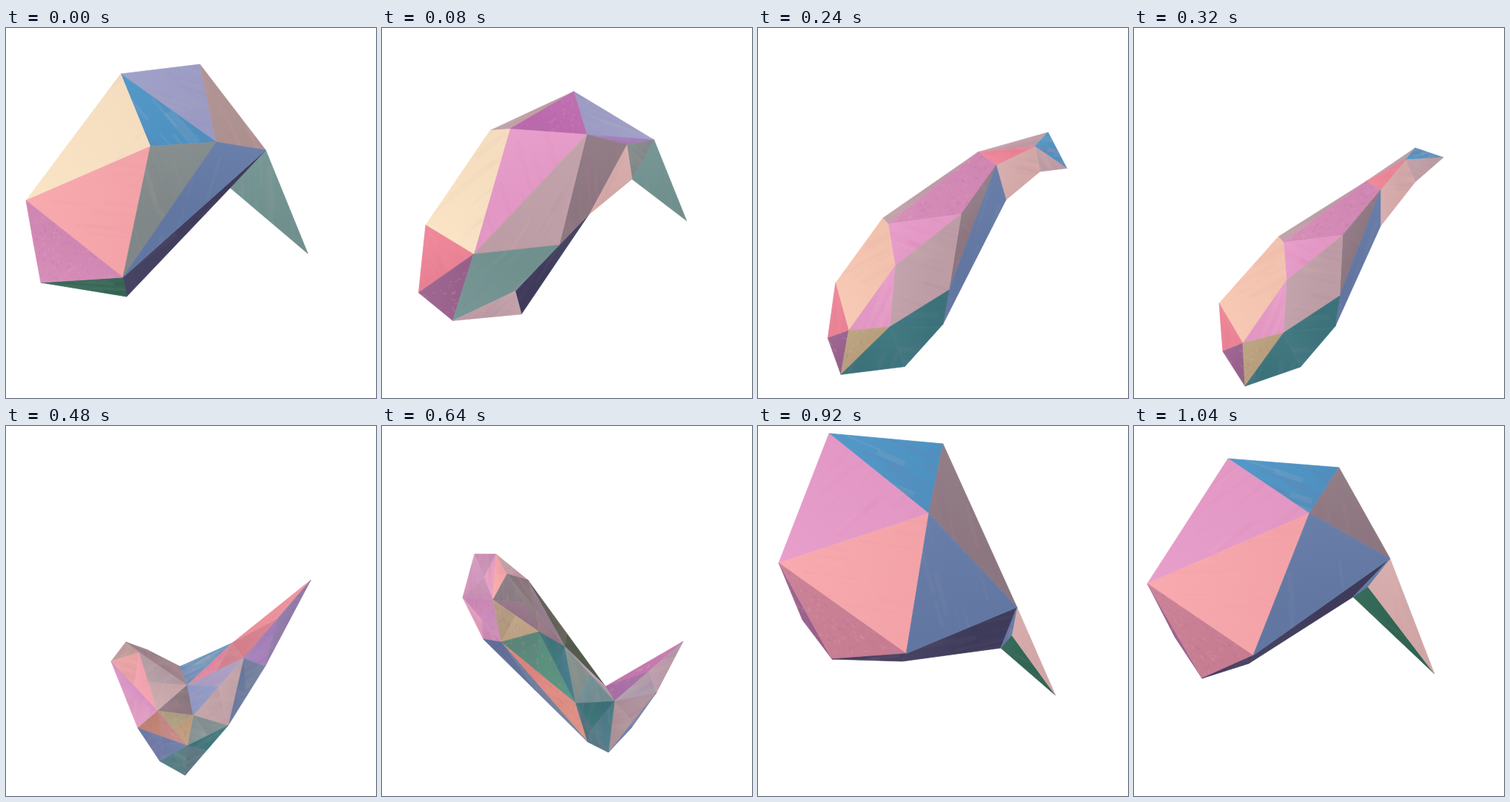
An HTML page with a canvas that plays this animation: 500 by 500 pixels, repeating every 1.12 s.

```html
<!DOCTYPE html>
<html lang="en">
<head>
<meta charset="utf-8">
<title>Faceted form</title>
<style>
  html, body { margin: 0; width: 100%; height: 100%; overflow: hidden; background: #fff; }
  canvas { display: block; width: 500px; height: 500px; }
</style>
</head>
<body>
<canvas id="stage" width="500" height="500"></canvas>
<script>
const LOOP = 1120, STEP = 40, HOLD = 1040;
const MARKS = 10; // corners a to j mark the same place on the body in every pose

const palette = {
  cream: '#fbe2c2', peach: '#f7c6b0', shell: '#edb3ad', blush: '#d5aaa9', pink: '#f8a5aa',
  rose: '#ee8295', petal: '#e799c8', orchid: '#d488b6', magenta: '#bc68ae', violet: '#a27dba',
  plum: '#985f8c', wine: '#c97c92', haze: '#bf9ea7', dusk: '#8c7680', lilac: '#9b9cc6',
  slate: '#5f77a3', sky: '#4a92c4', navy: '#3a3858', sage: '#6e918f', grey: '#7f8888',
  teal: '#37727a', jade: '#37806f', forest: '#2a624f', olive: '#4c5042', moss: '#5c6a54',
  sand: '#b9a07c', coral: '#dc8679', tan: '#ae9090'
};
const rough = ['orchid', 'wine', 'plum', 'coral', 'sand', 'moss', 'magenta', 'jade'];

// faces are painted from back to front
const poses = [
  { t: 0,
    pts: [155,62, 262,49, 351,165, 408,305, 303,216, 233,289, 163,363, 47,344, 37,290, 27,233,
          195,160, 284,154, 158,337],
    faces: 'sage cde, navy mceg, forest hmg, lilac abl, sky alk, tan blc, cream jak, pink jkm, ' +
           'orchid hijm, grey klm, slate lcm' },
  { t: 160,
    pts: [140,214, 265,130, 382,143, 415,219, 370,197, 322,222, 217,402, 156,444, 73,426, 90,302,
          293,162, 171,204, 154,342, 267,301, 350,150, 210,374],
    faces: 'sage cde, grey oce, blush oef, lilac cbk, violet kco, navy nfgp, dusk kofn, haze abl, ' +
           'magenta bkl, petal lkm, haze knm, cream jalm, rose jmi, plum imh, sage hmnp, haze pgh' },
  { t: 320,
    pts: [195,282, 314,207, 380,162, 418,175, 380,208, 333,268, 272,403, 225,458, 150,484, 115,372,
          202,290, 282,280, 333,219, 367,178, 206,341, 202,412, 147,426, 278,362, 120,437],
    faces: 'haze bcn, sky ncd, haze nde, blush mnef, rose bnm, haze abk, orchid kbml, petal klo, ' +
           'dusk lmr, slate mfgr, haze olrp, peach jakoq, petal oqp, rose jqs, plum sqi, sand qpi, ' +
           'teal phi, teal prgh' },
  { t: 480, split: true,
    pts: [162,292, 190,302, 235,325, 412,208, 350,325, 300,405, 242,472, 208,453, 178,408, 142,318,
          306,293, 180,306, 245,350, 253,391, 321,314, 205,385, 245,432],
    faces: 'rose kdo, violet ode, slate oef, blush ofn, sage nfq, teal fgq, dusk abcml, blush ajl, ' +
           'pink ljp, petal jpi, haze lmp, dusk mnp, sky ckm, rose kom, lilac mon, sand pnq, ' +
           'coral ipq, slate ihq, teal qgh' },
  { t: 640, split: true,
    pts: [125,173, 197,208, 302,352, 407,291, 371,360, 337,408, 306,441, 278,427, 137,288, 109,232,
          154,173, 169,200, 150,235, 212,278, 247,298, 314,372, 262,375, 161,292],
    faces: 'magenta cdp, haze pde, haze peg, slate efg, olive boc, haze ocp, petal akmj, pink klm, ' +
           'haze kbl, dusk lbon, dusk lnm, orchid jmr, petal jri, sand mnr, jade rnq, teal noq, ' +
           'sage opq, coral rqh, slate rhi, teal qpg, teal qgh' },
  { t: 800,
    pts: [84,73, 211,87, 366,372, 399,366, 375,408, 340,396, 243,301, 165,274, 108,254, 62,183,
          150,85, 227,147, 179,230, 78,177, 258,284, 323,311],
    faces: 'slate abk, olive bpl, peach akn, peach anj, shell nkm, blush kbl, grey klm, blush lpom, ' +
           'violet jni, coral nmi, moss imh, teal mogh, coral gof, blush opef, blush pce, haze cde' },
  { t: 920,
    pts: [96,10, 250,24, 350,245, 402,364, 328,300, 270,320, 195,318, 100,315, 60,262, 28,185] },
  { t: 1040,
    pts: [127,44, 277,56, 346,179, 406,335, 296,231, 225,276, 155,321, 92,341, 55,285, 18,213,
          237,118, 161,310, 316,217],
    faces: 'forest emd, blush cmd, navy lceg, slate cme, sky abk, dusk bck, petal jak, pink jkl, ' +
           'slate kcl, plum jhi, wine jlh, navy lgh' }
];

const ctx = document.getElementById('stage').getContext('2d');

function seeded(seed) {
  return () => (seed = (seed * 16807) % 2147483647) / 2147483647;
}

function mix(from, to, amount) {
  const part = (hex, i) => parseInt(hex.slice(1 + 2 * i, 3 + 2 * i), 16);
  return '#' + [0, 1, 2].map(i => Math.round(part(from, i) * (1 - amount) + part(to, i) * amount)
    .toString(16).padStart(2, '0')).join('');
}

// halve a triangle across its longest side
function halve(tri) {
  const length = i => {
    const p = tri[i], q = tri[(i + 1) % 3];
    return Math.hypot(p[0] - q[0], p[1] - q[1]);
  };
  const i = [0, 1, 2].reduce((a, b) => length(b) > length(a) ? b : a);
  const p = tri[i], q = tri[(i + 1) % 3], r = tri[(i + 2) % 3];
  const mid = [(p[0] + q[0]) / 2, (p[1] + q[1]) / 2];
  return [[p, mid, r], [mid, q, r]];
}

// turn a pose into painted facets; small gems get finer, more varied ones
function facets(pose) {
  const corners = [];
  for (let i = 0; i < pose.pts.length; i += 2) corners.push(pose.pts.slice(i, i + 2));
  const rnd = seeded(4001 + pose.t), sheen = Object.values(palette);
  return pose.faces.split(', ').flatMap(face => {
    const [name, letters] = face.split(' ');
    const poly = [...letters].map(c => corners[c.charCodeAt(0) - 97]);
    const add = (pts, colour) => ({ pts, colour, name, seed: 1 + Math.floor(rnd() * 1e6) });
    if (!pose.split) return [add(poly, palette[name])];
    return poly.slice(2).flatMap((p, i) => halve([poly[0], poly[i + 1], p]))
      .map(tri => add(tri, mix(palette[name], sheen[Math.floor(rnd() * sheen.length)], 0.16)));
  });
}

const shapes = poses.filter(p => p.faces).map(p => ({ t: p.t, hull: p.pts.slice(0, 2 * MARKS), list: facets(p) }));

function poseAt(i) {
  const n = poses.length, k = (i + n) % n;
  return { t: poses[k].t + LOOP * Math.floor(i / n), pts: poses[k].pts };
}

// smooth periodic curve through every landmark
function hullAt(t) {
  let i = poses.length - 1;
  while (poses[i].t > t) i--;
  const [o, a, b, c] = [i - 1, i, i + 1, i + 2].map(poseAt);
  const span = b.t - a.t, u = (t - a.t) / span, v = 1 - u;
  return a.pts.slice(0, 2 * MARKS).map((p, k) => {
    const q = b.pts[k];
    const m = (q - o.pts[k]) / (b.t - o.t) * span;
    const n = (c.pts[k] - p) / (c.t - a.t) * span;
    return p * (1 + 2 * u) * v * v + m * u * v * v + q * u * u * (3 - 2 * u) - n * u * u * v;
  });
}

// shift a corner with the landmarks closest to it
function bend([x, y], from, to) {
  let sum = 0, dx = 0, dy = 0;
  for (let i = 0; i < from.length; i += 2) {
    const w = 1 / ((x - from[i]) ** 2 + (y - from[i + 1]) ** 2 + 1) ** 1.2;
    sum += w;
    dx += w * (to[i] - from[i]);
    dy += w * (to[i + 1] - from[i + 1]);
  }
  return [x + dx / sum, y + dy / sum];
}

// soft brushed streaks, or short specks on rough colours
function texture(path, pts, { name, colour, seed }, dir) {
  const [w, h] = [0, 1].map(k => Math.max(...pts.map(p => p[k])) - Math.min(...pts.map(p => p[k])));
  const [x0, y0] = [0, 1].map(k => Math.min(...pts.map(p => p[k])));
  const rnd = seeded(seed), specks = rough.includes(name);
  const count = specks ? w * h / 60 : 24;
  ctx.save();
  ctx.clip(path);
  for (let i = 0; i < count; i++) {
    const x = x0 + rnd() * w, y = y0 + rnd() * h;
    const len = specks ? 2 + rnd() * 5 : 30 + rnd() * 60;
    const a = dir + (specks ? rnd() - 0.5 : 0);
    ctx.strokeStyle = mix(colour, rnd() < 0.5 ? palette.peach : palette.plum, 0.5);
    ctx.globalAlpha = specks ? 0.25 : name === 'sky' ? 0.18 : 0.06;
    ctx.lineWidth = specks ? 1 + rnd() * 1.5 : 2 + rnd() * 6;
    ctx.beginPath();
    ctx.moveTo(x, y);
    ctx.lineTo(x + Math.cos(a) * len, y + Math.sin(a) * len);
    ctx.stroke();
  }
  ctx.restore();
}

function drawFacet(facet, pts) {
  const [[x, y], ...rest] = pts;
  const mx = rest.reduce((s, p) => s + p[0], 0) / rest.length;
  const my = rest.reduce((s, p) => s + p[1], 0) / rest.length;
  const fill = ctx.createLinearGradient(x, y, mx, my);
  fill.addColorStop(0, mix(facet.colour, '#ffffff', 0.06));
  fill.addColorStop(1, mix(facet.colour, palette.dusk, 0.05));
  const path = new Path2D();
  pts.forEach(p => path.lineTo(...p));
  path.closePath();
  ctx.fillStyle = ctx.strokeStyle = fill;
  ctx.lineWidth = 0.7;
  ctx.lineJoin = 'round';
  ctx.fill(path);
  ctx.stroke(path);
  texture(path, pts, facet, Math.atan2(my - y, mx - x));
}

function draw(t) {
  const away = s => Math.min(Math.abs(s.t - t), LOOP - Math.abs(s.t - t));
  const shape = shapes.reduce((a, b) => away(b) <= away(a) ? b : a);
  const hull = hullAt(t);
  ctx.fillStyle = '#fff';
  ctx.fillRect(0, 0, 500, 500);
  shape.list.forEach(f => drawFacet(f, f.pts.map(p => bend(p, shape.hull, hull))));
}

const began = performance.now();
let shown = -1;
function tick() {
  const now = (performance.now() - began) % LOOP;
  const t = Math.min(Math.floor(now / STEP) * STEP, HOLD);
  if (t !== shown) draw(shown = t);
  requestAnimationFrame(tick);
}
tick();
</script>
</body>
</html>
```
